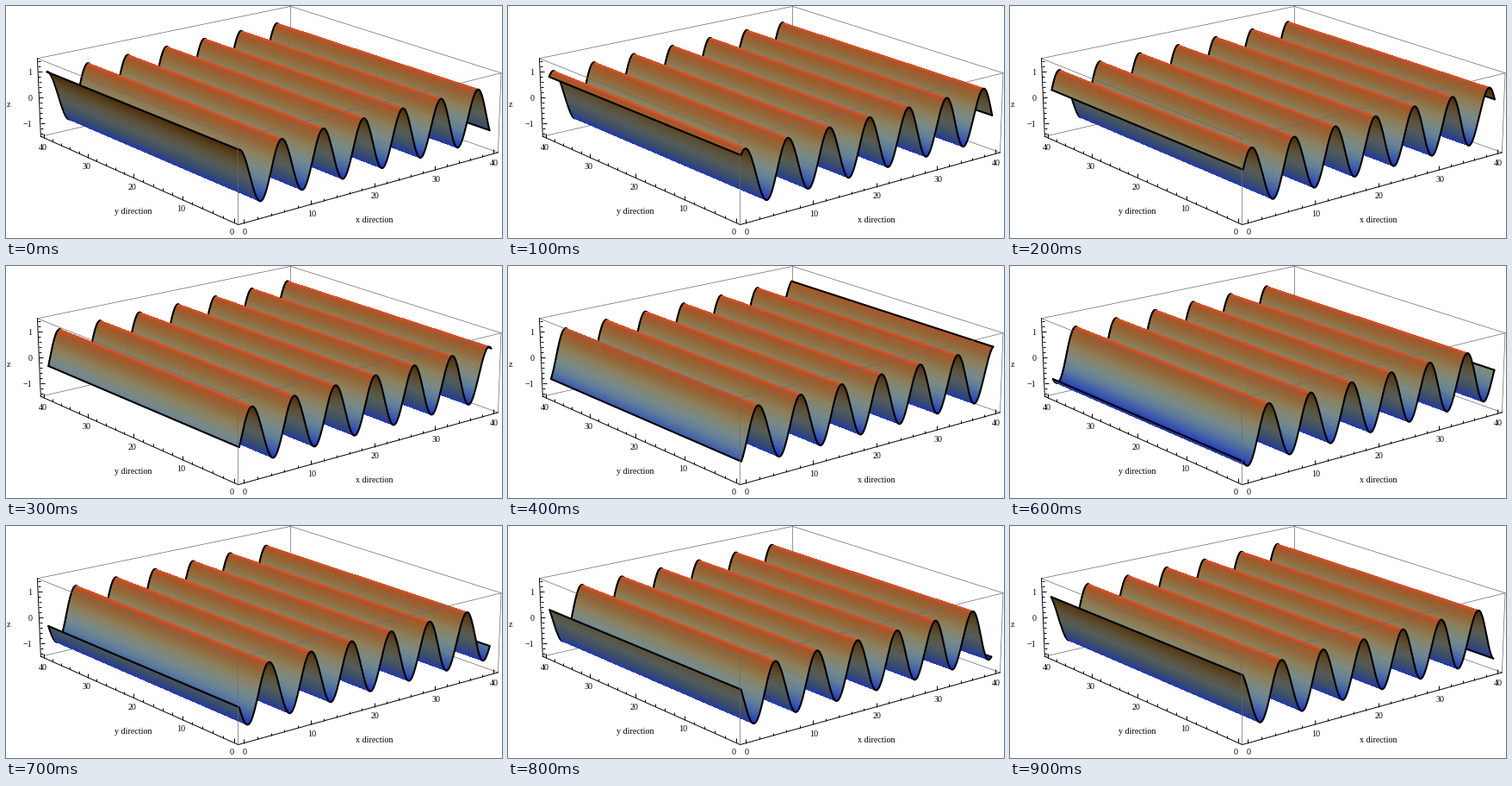
Write a matplotlib script that moves like this. It is 576x269 px and loops after 1 s.

```python
import numpy as np
import matplotlib.pyplot as plt
from matplotlib.animation import FuncAnimation
from matplotlib.collections import LineCollection, PolyCollection

W, H, DPI = 576, 269, 100
FRAMES, INTERVAL = 10, 100
SIZE, PAD, ZMAX = 40, 0.83, 1.5
LO, HI = -PAD, SIZE + PAD
STRIPS = 400
GRAY = "#686870"

# Space points (x, y, z) and the screen pixels where the camera shows them.
ANCHORS = [
    ((LO, LO, -ZMAX), (269, 253)), ((LO, LO, ZMAX), (269, 153)),
    ((HI, LO, -ZMAX), (571, 169)), ((HI, LO, ZMAX), (574, 77)),
    ((LO, HI, -ZMAX), (40, 151)), ((LO, HI, ZMAX), (36, 60)),
    ((HI, HI, ZMAX), (330, 0)),
    ((0, 0, 1), (269, 165.5)), ((0, SIZE, 1), (47, 76)),
    ((SIZE, 0, 0.977), (563, 93)), ((SIZE, SIZE, 0.977), (329, 17)),
    ((2 * np.pi, 0, 1), (320, 154)), ((12 * np.pi, 0, 1), (548, 97)),
]

# Colours by height for the two sides of the sheet.
TOP_SIDE = [
    (-1.0, (36, 58, 190)), (-0.8, (62, 92, 170)), (-0.45, (98, 128, 152)),
    (-0.1, (122, 138, 134)), (0.3, (140, 128, 92)), (0.65, (146, 104, 56)),
    (0.93, (168, 84, 40)), (1.0, (216, 84, 44)),
]
UNDERSIDE = [
    (-1.0, (36, 58, 200)), (-0.85, (42, 62, 140)), (-0.5, (62, 80, 102)),
    (-0.1, (84, 92, 88)), (0.3, (92, 82, 58)), (0.7, (84, 60, 26)),
    (1.0, (66, 38, 8)),
]


def fit_camera(anchors):
    """Least-squares perspective camera as a 3x4 matrix."""
    rows, values = [], []
    for (x, y, z), (u, v) in anchors:
        p = np.array([x / SIZE, y / SIZE, z, 1])
        for k, s in enumerate((u / W, v / W)):
            row = np.zeros(11)
            row[4 * k:4 * k + 4] = p
            row[8:] = -s * p[:3]
            rows.append(row)
            values.append(s)
    solution = np.linalg.lstsq(np.array(rows), np.array(values), rcond=None)[0]
    return np.append(solution, 1).reshape(3, 4)


CAMERA = fit_camera(ANCHORS)


def project(x, y, z):
    x, y, z = np.broadcast_arrays(x, y, z)
    p = np.stack([x / SIZE, y / SIZE, z, np.ones(x.shape)], axis=-1) @ CAMERA.T
    return W * p[..., :2] / p[..., 2:]


def shade(palette, z):
    heights, colors = zip(*palette)
    channels = np.array(colors).T / 255
    return np.stack([np.interp(z, heights, c) for c in channels], axis=-1)


fig = plt.figure(figsize=(W / DPI, H / DPI), dpi=DPI, facecolor="white")
ax = fig.add_axes([0, 0, 1, 1])
ax.set_xlim(-0.5, W - 0.5)
ax.set_ylim(H - 0.5, -0.5)
ax.axis("off")


def edge(a, b, color=GRAY, width=0.5, layer=1):
    (x0, y0), (x1, y1) = project(*a), project(*b)
    ax.plot([x0, x1], [y0, y1], color=color, lw=width, zorder=layer)


def label(x, y, text, align="center"):
    ax.text(x, y, text, family="Liberation Serif", size=10 * 72 / DPI,
            ha=align, va="center_baseline", zorder=6)


def draw_box():
    back = (HI, HI)
    for corner in ((LO, HI), (HI, LO)):
        for z in (-ZMAX, ZMAX):
            edge((*corner, z), (*back, z))
        edge((*corner, ZMAX), (LO, LO, ZMAX), layer=4)
        edge((*corner, -ZMAX), (LO, LO, -ZMAX), "black", 0.7, 4)
    edge((*back, -ZMAX), (*back, ZMAX))
    edge((HI, LO, -ZMAX), (HI, LO, ZMAX))
    edge((LO, LO, -ZMAX), (LO, LO, ZMAX), layer=4)
    edge((LO, HI, -ZMAX), (LO, HI, ZMAX), "black", 0.7, 4)


def draw_ticks():
    marks = []
    for n in range(0, SIZE + 1, 2):
        major = n % 10 == 0
        for point, shift in (((n, LO, -ZMAX), 1), ((LO, n, -ZMAX), -2)):
            u, v = project(*point)
            marks.append([(u, v), (u, v - (5 if major else 3))])
            if major:
                label(u + shift, v + 10, str(n))
    for n in range(-7, 8):
        u, v = project(LO, HI, n / 5)
        major = n % 5 == 0
        marks.append([(u, v), (u + (5 if major else 3), v)])
        if major:
            label(30, v, str(n // 5).replace("-", "\u2212"), "right")
    ax.add_collection(LineCollection(marks, colors="black", linewidths=0.7, zorder=4))


draw_box()
draw_ticks()
label(427, 247, "x direction")
label(147, 237, "y direction")
label(2, 113, "z")

xs = np.linspace(0, SIZE, STRIPS + 1)
sheet = PolyCollection([], joinstyle="round", capstyle="round", zorder=2)
ax.add_collection(sheet, autolim=False)
rim, = ax.plot([], [], color="black", lw=1.5, zorder=3,
               solid_joinstyle="round", solid_capstyle="round")


def update(frame):
    phase = 2 * np.pi * frame / FRAMES
    z = np.cos(xs - phase)
    front, rear = project(xs, 0, z), project(xs, SIZE, z)

    along, across = rear[:-1] - front[:-1], front[1:] - front[:-1]
    seen_from_top = along[:, 0] * across[:, 1] - along[:, 1] * across[:, 0] > 0
    mid = np.cos((xs[1:] + xs[:-1]) / 2 - phase)
    fills = np.where(seen_from_top[:, None], shade(TOP_SIDE, mid), shade(UNDERSIDE, mid))

    shapes, faces, widths = [], [], []

    def add(points, face, width):
        shapes.append(points)
        faces.append((*face, 1))
        widths.append(width)

    # Far strips come first so nearer ones hide them.
    for i in reversed(range(STRIPS)):
        add([front[i], rear[i], rear[i + 1], front[i + 1]], fills[i], 0)
        add([rear[i], rear[i + 1]], (0, 0, 0), 1.5)
        if i == STRIPS - 4:
            add([front[-1], rear[-1]], (0, 0, 0), 1.5)
    sheet.set_verts(shapes, closed=False)
    sheet.set_facecolor(faces)
    sheet.set_edgecolor([(0, 0, 0, 1 if w else 0) for w in widths])
    sheet.set_linewidth(widths)
    sheet.set_antialiased([w > 0 for w in widths])

    rim.set_data(*np.vstack([rear[:1], front]).T)
    return sheet, rim


anim = FuncAnimation(fig, update, frames=FRAMES, interval=INTERVAL,
                     repeat=True, repeat_delay=0, blit=False)
plt.show()
```
